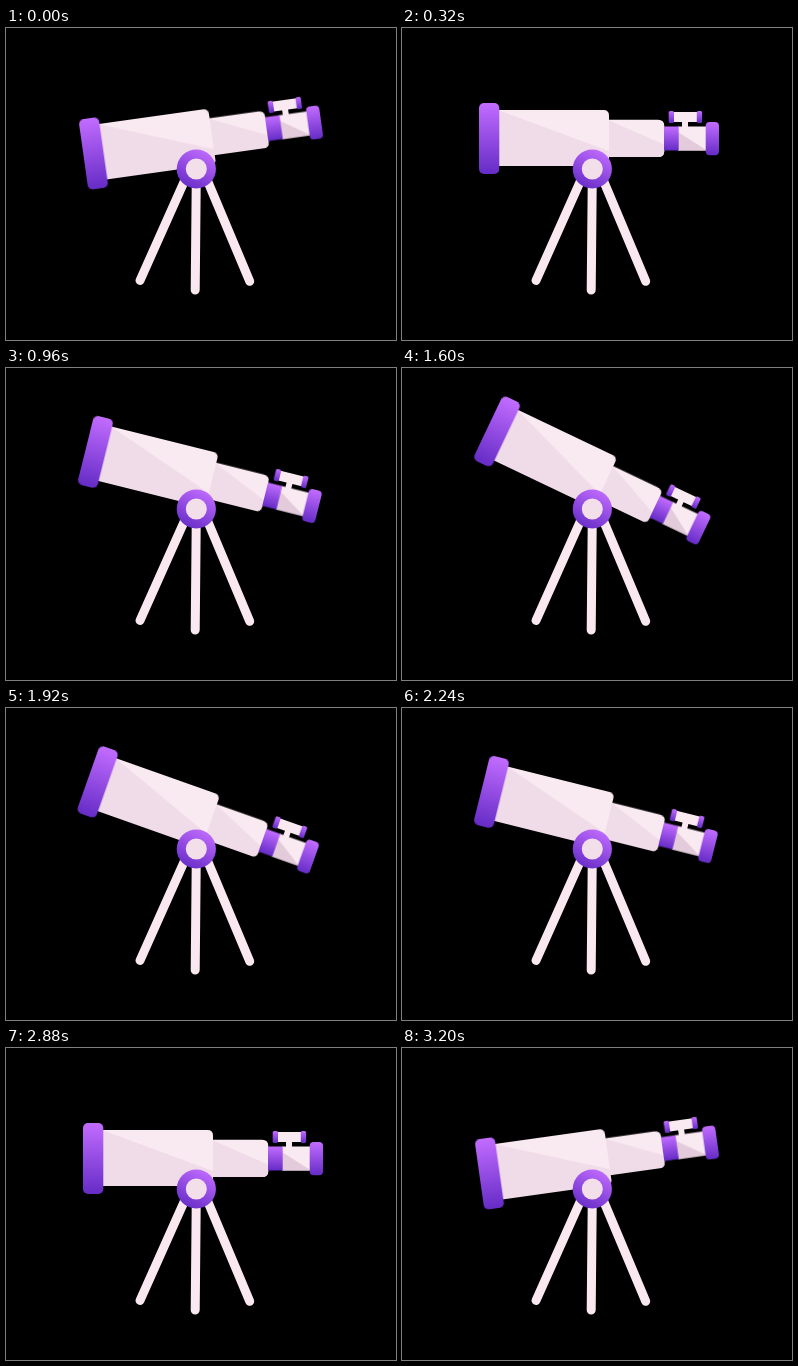
An HTML page without scripts for the animation above (3520 ms loop, 390 px wide and 312 px high).

```html
<!DOCTYPE html>
<html lang="en">
<head>
<meta charset="utf-8">
<title>Telescope</title>
<style>
  html, body { margin: 0; width: 100%; height: 100%; overflow: hidden; background: #000; }
  svg { display: block; width: 390px; height: 312px; }
  .tube { transform-origin: 198.75px 110.5px; animation: tilt 3.52s step-end infinite; }
  .purple { fill: url(#violet); }
  .light { fill: #f9e9f0; }
  .shade { fill: #f0dce8; }
  .legs { fill: none; stroke: #fae8f0; stroke-width: 9; stroke-linecap: round; }
  /* eleven equal holds: up to the peak and back */
  @keyframes tilt {
    0%, 90.909%, 100% { transform: translate(-.75px, -.5px) rotate(-8deg); }
    9.0909%, 81.818% { transform: none; }
    18.1818%, 72.727% { transform: translate(-.3px, .2px) rotate(7deg); }
    27.2727%, 63.636% { transform: translate(-1px, .4px) rotate(14deg); }
    36.3636%, 54.545% { transform: translate(-1.9px, .7px) rotate(19.5deg); }
    45.4545% { transform: translate(-3px, 1px) rotate(25.5deg); }
  }
</style>
</head>
<body>
<svg viewBox="0 0 390 312">
  <defs>
    <linearGradient id="violet" x1="0" y1="0" x2="0" y2="1">
      <stop offset="0" stop-color="#c26cff"/>
      <stop offset="1" stop-color="#652cc6"/>
    </linearGradient>
    <linearGradient id="ring" x1=".75" y1="0" x2=".25" y2="1">
      <stop offset="0" stop-color="#c26cff"/>
      <stop offset="1" stop-color="#652cc6"/>
    </linearGradient>
    <clipPath id="barrel"><path d="M96 82H201.500Q207 82 207 87.500V132.500Q207 138 201.500 138H96Z"/></clipPath>
    <clipPath id="draw"><path d="M206 91.700H256Q262.300 91.700 262.300 98V122.700Q262.300 129 256 129H206Z"/></clipPath>
  </defs>

  <path class="legs" d="M178 154L134 252.500M190.200 158L189.200 262M202 154L243.700 253.300"/>

  <g class="tube">
    <g clip-path="url(#draw)">
      <path class="light" d="M206 91H263V130H206Z"/>
      <path class="shade" d="M206 92L263 117V130H206Z"/>
    </g>
    <g clip-path="url(#barrel)">
      <path class="light" d="M96 82H207V138H96Z"/>
      <path class="shade" d="M96 82L207 123V138H96Z"/>
    </g>
    <rect class="purple" x="77" y="75" width="20.300" height="71" rx="5"/>

    <path class="light" d="M276 98.500H305V122.500H276Z"/>
    <path d="M276 104L305 122.500H276Z" fill="#e3cbdb"/>
    <rect class="purple" x="262" y="98.500" width="14.700" height="24"/>
    <rect class="purple" x="303.700" y="94" width="13.300" height="33.300" rx="4"/>

    <path class="light" d="M271 84H296V94H286V99H280V94H271Z"/>
    <rect class="purple" x="266.700" y="83" width="5.300" height="12" rx="1.500"/>
    <rect class="purple" x="294.800" y="83" width="5.300" height="12" rx="1.500"/>
  </g>

  <circle cx="190.300" cy="141" r="19.600" fill="url(#ring)"/>
  <circle cx="190.300" cy="141" r="10.500" fill="#f3dfea"/>
</svg>
</body>
</html>
```
